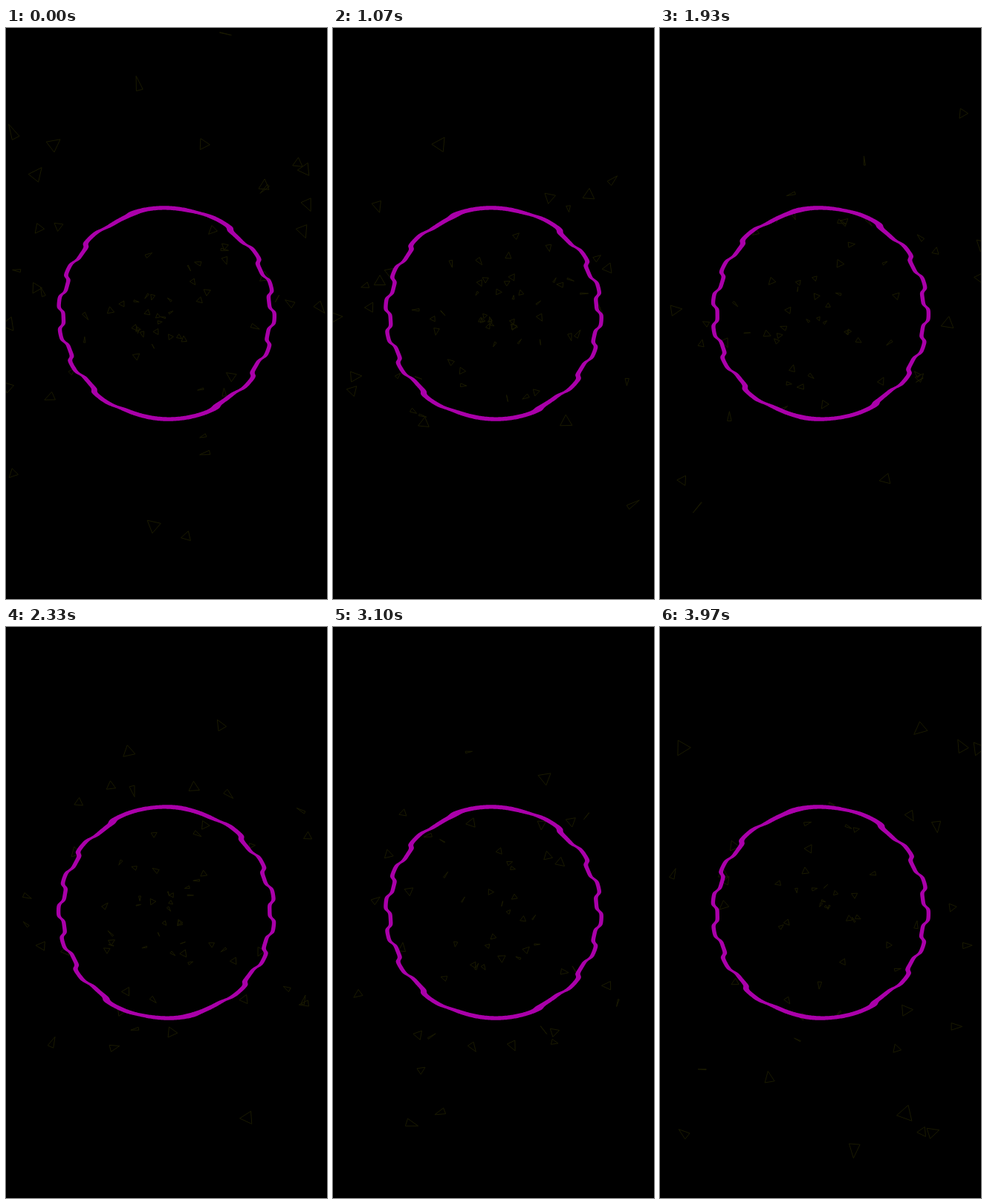
Animation of 432x768 px, one loop 4010 ms. Source, as an HTML page with a canvas:

```html
<!DOCTYPE html>
<html lang="en">
<head>
<meta charset="utf-8">
<title>Ring and triangles</title>
<style>
  html, body { margin: 0; width: 100%; height: 100%; overflow: hidden; background: #000; }
  canvas { display: block; }
</style>
</head>
<body>
<canvas id="stage" width="432" height="768"></canvas>
<script>
const W = 432, H = 768, CX = 216, CY = 384;
const LOOP = 4010, FRAMES = 120, STEP = LOOP / FRAMES;
const TAU = Math.PI * 2;
const LIFE = 2.2, BITS = 190;
const WAVE = { length: 43.4, crest: 390, height: 3.3, edge: 2.4, cycles: 4 };
const ctx = document.getElementById('stage').getContext('2d');

let seed = 4127;
function rand(lo, hi) {
  seed = (seed * 16807) % 2147483647;
  return lo + (hi - lo) * seed / 2147483647;
}

// Each triangle leaves the centre at a steady speed, grows and tumbles.
const bits = Array.from({ length: BITS }, () => ({
  birth: rand(-LIFE, LOOP / 1000),
  dir: rand(0, TAU),
  speed: rand(50, 195),
  size: rand(3, 4.5),
  grow: rand(.012, .034),
  heading: rand(0, TAU),
  turn: rand(-1.2, 1.2),
  tilt: rand(0, TAU),
  flip: rand(1, 3)
}));

function drawBit(b, t) {
  const age = t - b.birth;
  if (age < 0 || age > LIFE) return;
  const r = 4 + b.speed * age;
  const size = b.size + b.grow * r;
  const a = b.heading + b.turn * age;
  const flat = Math.cos(b.tilt + b.flip * age);
  const x = CX + r * Math.cos(b.dir), y = CY + r * Math.sin(b.dir);
  ctx.beginPath();
  for (let i = 0; i < 3; i++) {
    const u = size * Math.cos(i * TAU / 3);
    const v = size * Math.sin(i * TAU / 3) * flat;
    ctx.lineTo(x + u * Math.cos(a) - v * Math.sin(a), y + u * Math.sin(a) + v * Math.cos(a));
  }
  ctx.closePath();
  ctx.stroke();
}

// Sideways wave with flattened crests that travels down the ring.
function sway(y, phase) {
  const p = TAU * ((y - WAVE.crest) / WAVE.length - phase);
  return WAVE.height * Math.tanh(WAVE.edge * Math.cos(p)) / Math.tanh(WAVE.edge);
}

function addCircle(radius, phase) {
  const n = 720;
  for (let i = 0; i < n; i++) {
    const a = i * TAU / n;
    const y = CY + radius * Math.sin(a);
    const x = CX + radius * Math.cos(a) + sway(y, phase);
    if (i) ctx.lineTo(x, y); else ctx.moveTo(x, y);
  }
  ctx.closePath();
}

function draw(ms) {
  const frame = Math.floor(ms / STEP + .1) % FRAMES;
  const phase = WAVE.cycles * frame / FRAMES;
  ctx.fillStyle = '#000';
  ctx.fillRect(0, 0, W, H);

  ctx.strokeStyle = '#1a1a00';
  ctx.lineWidth = 1;
  for (const b of bits) drawBit(b, frame * STEP / 1000);

  ctx.fillStyle = '#aa00aa';
  ctx.beginPath();
  addCircle(144.8, phase);
  addCircle(139.4, phase);
  ctx.fill('evenodd');
}

const start = performance.now();
function tick() {
  draw((performance.now() - start) % LOOP);
  requestAnimationFrame(tick);
}
tick();
</script>
</body>
</html>
```
